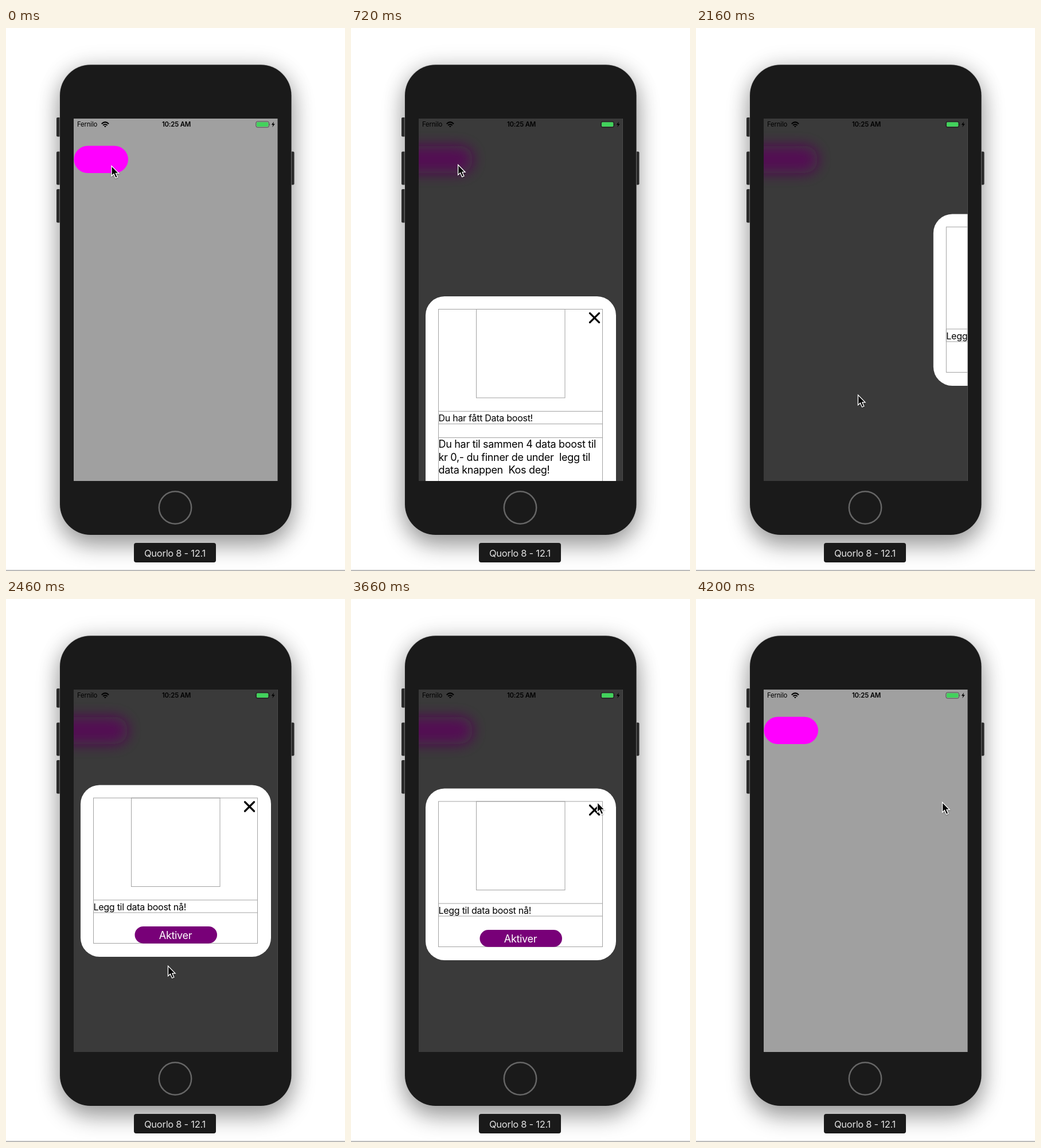
These frames come from a looping animation (591 px wide and 947 px high, 4.26 s). An HTML page:

```html
<!DOCTYPE html>
<html lang="nb">
<head>
<meta charset="utf-8">
<style>
  html, body { margin: 0; height: 100%; overflow: hidden; background: #fff; }
  svg { display: block; width: 100vw; height: 100vh; }
  text { font-family: Inter, "Open Sans", sans-serif; letter-spacing: -.017em; white-space: pre; }
  .line { fill: none; stroke: #a2a2a2; stroke-width: 1; }
  .label { font-size: 16px; }
  .copy, .action { font-size: 18px; }
  .action { fill: #fff; text-anchor: middle; }
  .status { font-size: 11.4px; }
</style>
</head>
<body>
<svg viewBox="0 0 591 947">
  <defs>
    <clipPath id="screen"><rect x="118" y="158" width="355.5" height="632"/></clipPath>
    <filter id="soft" x="-50%" y="-100%" width="200%" height="300%"><feGaussianBlur stdDeviation="12"/></filter>
    <filter id="shade" x="-30%" y="-30%" width="160%" height="160%"><feGaussianBlur stdDeviation="20"/></filter>
    <filter id="drop" x="-50%" y="-50%" width="200%" height="200%">
      <feDropShadow dx="0" dy="1" stdDeviation="1" flood-opacity=".4"/>
    </filter>
  </defs>

  <rect width="591" height="947" fill="#fff"/>
  <rect x="94" y="64" width="404" height="820" rx="54" opacity=".13" filter="url(#shade)"/>
  <rect x="94" y="82" width="404" height="820" rx="54" opacity=".36" filter="url(#shade)"/>
  <g fill="#2a2a2a">
    <rect x="88" y="156" width="9" height="33.5" rx="2"/>
    <rect x="88" y="215.500" width="9" height="58" rx="2"/>
    <rect x="88" y="281" width="9" height="58.500" rx="2"/>
    <rect x="494" y="215.500" width="8.500" height="58" rx="2"/>
  </g>
  <rect x="93.500" y="63.500" width="404.500" height="821" rx="54" fill="#b5b5b5"/>
  <rect x="94" y="64.300" width="403.500" height="819.700" rx="53.500" fill="#1a1a1a"/>
  <circle cx="295" cy="836.500" r="28.200" fill="none" stroke="#666" stroke-width="2.500"/>
  <rect x="223" y="898" width="143" height="34" rx="4" fill="#1a1a1a"/>
  <text x="294.500" y="922" font-size="16.500" fill="#e2e2e2" text-anchor="middle">Quorlo 8 - 12.1</text>
  <rect y="945.500" width="591" height="1" fill="#777"/>

  <g clip-path="url(#screen)">
    <rect x="118" y="158" width="356" height="632" fill="#a0a0a0"/>
    <rect x="118.500" y="205.500" width="94.500" height="47.500" rx="23.750" fill="#f0f"/>
    <g id="dim">
      <rect x="118" y="158" width="356" height="632" fill="#3a3a3a"/>
      <rect x="50" y="205.500" width="163" height="47.500" rx="23.750" fill="#530953" filter="url(#soft)"/>
    </g>
    <g id="gift"></g>
    <g id="offer"></g>

    <text class="status" x="124" y="172">Fernilo</text>
    <text class="status" x="297" y="172" text-anchor="middle" font-weight="600">10:25 AM</text>
    <g fill="none" stroke="#000" stroke-width="2">
      <path d="M166.700 167.200Q172.900 161 179.100 167.200M169.200 169.700Q172.900 166.200 176.600 169.700"/>
      <path d="M171 171.200Q172.900 169.600 174.800 171.200L172.900 173.200Z" fill="#000" stroke="none"/>
    </g>
    <rect x="435.800" y="163" width="22.700" height="10.300" rx="2.800" fill="none" stroke="#000" stroke-opacity=".5"/>
    <rect x="437" y="164.200" width="20.300" height="7.900" rx="1.600" fill="#42d25c"/>
    <path d="M459.600 166.500q1.800 1.700 0 3.400z" opacity=".5"/>
    <path d="M467 163.300L462.800 168.800H465.500L464.300 173L468.800 167.200H466Z"/>
  </g>

  <g id="cursor" filter="url(#drop)">
    <path d="M0 0V17.500L3.900 13.900L7 21L10.300 19.600L7.300 12.800H12.500Z" stroke="#fff" stroke-width="1.300"/>
  </g>
</svg>
<script>
const $ = id => document.getElementById(id);
const LOOP = 4260, STEP = 60;

const box = (x, y, w, h) => `<rect class="line" x="${x}" y="${y}" width="${w}" height="${h}"/>`;

// A dialog in its own coordinates; its top left corner is 0,0.
function dialog(height, title, copy, action) {
  const top = height - 53;
  const lines = copy.map((s, i) => `<text class="copy" x="22.500" y="${264 + i * 22.7}">${s}</text>`);
  return `<rect width="332" height="${height}" rx="33" fill="#fff"/>
    ${box(22.5, 22.5, 286, height - 46)}
    ${box(88.5, 22.5, 154.5, 154.5)}
    ${box(22.5, 200.5, 286, 22)}
    ${copy.length ? box(22.5, 246.5, 286, 90) : ""}
    <path d="M286.500 29.500l16 16m0-16l-16 16" stroke="#000" stroke-width="3.200" stroke-linecap="round"/>
    <text class="label" x="22.500" y="218">${title}</text>
    ${lines.join("")}
    <rect x="94.500" y="${top}" width="143.500" height="29.700" rx="14.850" fill="#780078"/>
    <text class="action" x="165.500" y="${top + 22}">${action}</text>`;
}

$("gift").innerHTML = dialog(413, "Du har fått Data boost!", [
  "Du har til sammen 4 data boost til",
  "kr 0,- du finner de under  legg til",
  "data knappen  Kos deg!"
], "Vis meg");
$("offer").innerHTML = dialog(299.5, "Legg til data boost nå!", [], "Aktiver");

// time, x, y of the pointer tip
const path = [
  [0, 184, 240.5], [540, 186.5, 238.5], [1080, 187, 239], [1320, 297.5, 346.5],
  [1560, 288, 633], [1740, 282.5, 640], [2760, 282.5, 640], [2880, 270, 635],
  [3120, 386.5, 429], [3300, 425, 363], [3600, 429.5, 354.5], [LOOP, 429.5, 354.5]
];

const ease = (t, start, length) => {
  const p = Math.min(1, Math.max(0, (t - start) / length));
  return p * p * (3 - 2 * p);
};

const move = (id, x, y) => $(id).setAttribute("transform", `translate(${x} ${y})`);

function draw(t) {
  $("dim").setAttribute("opacity", ease(t, 409, 240) - ease(t, 3731, 240));
  move("gift", 130 + 355 * ease(t, 1635, 400), 268 + 632 * (1 - ease(t, 470, 400)));
  move("offer", 130 + 355 * (1 - ease(t, 2045, 400)), 324.5 + 632 * ease(t, 3637, 400));

  const i = path.findIndex(p => p[0] > t);
  const [a, b] = [path[i - 1], path[i]];
  const k = ease(t, a[0], b[0] - a[0]);
  move("cursor", a[1] + (b[1] - a[1]) * k, a[2] + (b[2] - a[2]) * k);
}

const begin = performance.now();
function tick() {
  const t = (performance.now() - begin) % LOOP;
  draw(Math.floor(t / STEP) * STEP);
  requestAnimationFrame(tick);
}
tick();
</script>
</body>
</html>
```
